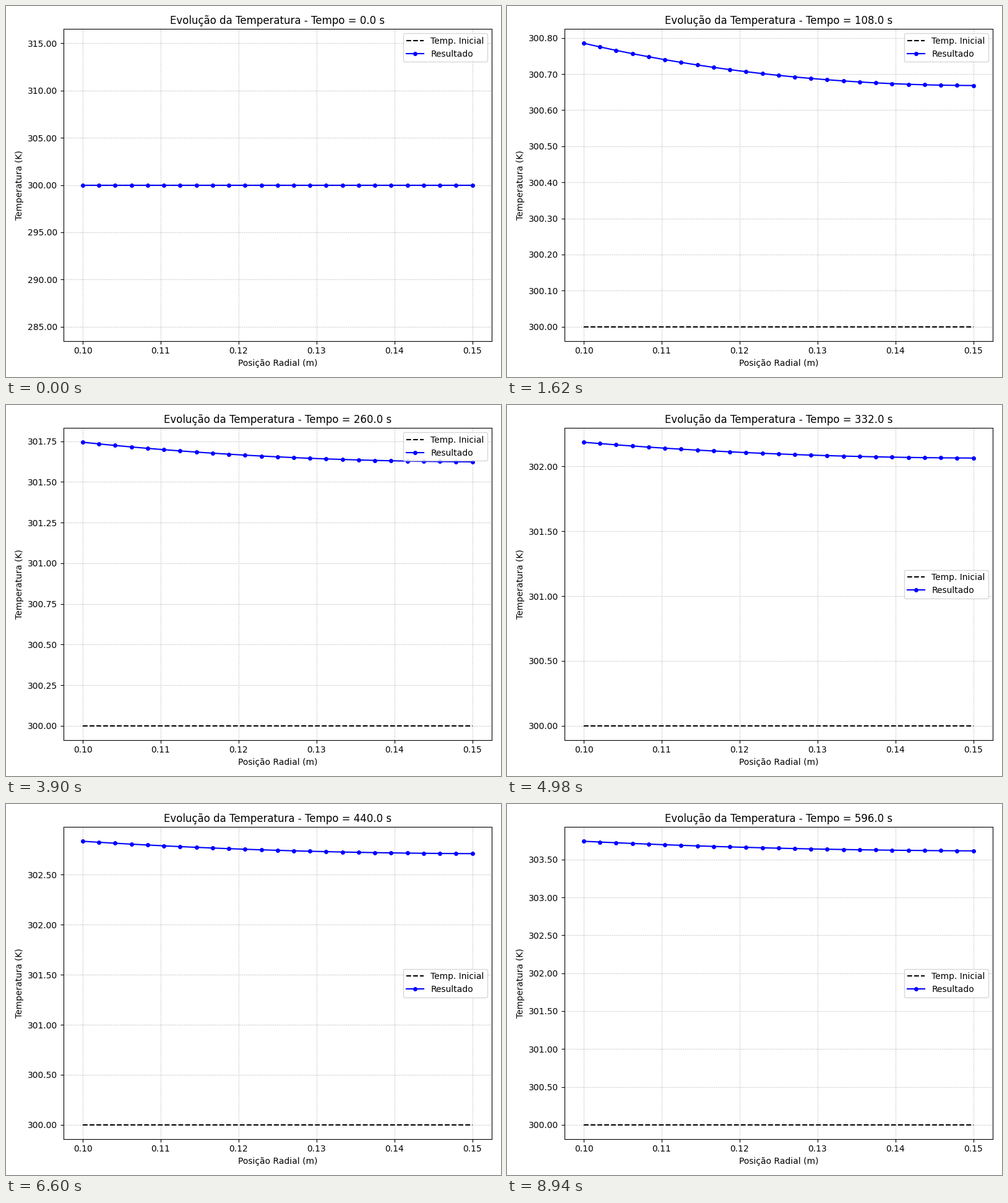
Animation, 800 px wide and 600 px high, one loop 9000 ms. Source, as a matplotlib script:

```python
import numpy as np
import matplotlib.pyplot as plt
from matplotlib.animation import FuncAnimation

# Aluminium tube: constant flux on the inner wall, convection on the outer one
K, RHO, CP = 200.0, 2700.0, 900.0
FLUX, H, T0 = 1000.0, 25.0, 300.0
N, FRAMES, STEP, SUB = 25, 150, 4.0, 80

r = np.linspace(0.10, 0.15, N)


def solve():
    """Finite volumes in r, Crank-Nicolson in time; one row per frame."""
    dr = r[1] - r[0]
    face = np.concatenate(([r[0]], (r[:-1] + r[1:]) / 2, [r[-1]]))
    cap = RHO * CP * (face[1:] ** 2 - face[:-1] ** 2) / 2
    cond = K * face[1:-1] / dr

    a = np.diag(cond, 1) + np.diag(cond, -1)
    a -= np.diag(a.sum(axis=1))
    a[-1, -1] -= H * r[-1]
    a /= cap[:, None]
    heat = np.zeros(N)
    heat[0] = FLUX * r[0] / cap[0]

    steady = np.linalg.solve(a, -heat)
    half = a * STEP / SUB / 2
    eye = np.eye(N)
    advance = np.linalg.matrix_power(np.linalg.solve(eye - half, eye + half), SUB)

    rows = [np.full(N, T0)]
    gap = -steady
    for _ in range(FRAMES - 1):
        gap = advance @ gap
        rows.append(T0 + steady + gap)
    return rows


temps = solve()

fig, ax = plt.subplots(figsize=(8, 6), dpi=100)
ax.plot(r, temps[0], "k--", label="Temp. Inicial")
curve, = ax.plot(r, temps[0], "bo-", markersize=4, label="Resultado")
ax.set_xlabel("Posição Radial (m)")
ax.set_ylabel("Temperatura (K)")
ax.yaxis.set_major_formatter("{x:.2f}")
ax.grid(True, linestyle=":")
ax.legend(loc="best")


def update(i):
    curve.set_data(r, temps[i])
    ax.relim()
    ax.autoscale_view()
    ax.set_title(f"Evolução da Temperatura - Tempo = {i * STEP:.1f} s")
    return curve,


update(0)
fig.tight_layout()

anim = FuncAnimation(fig, update, frames=FRAMES, init_func=lambda: update(0),
                     interval=60, repeat=True, repeat_delay=0, blit=False)
plt.show()
```
